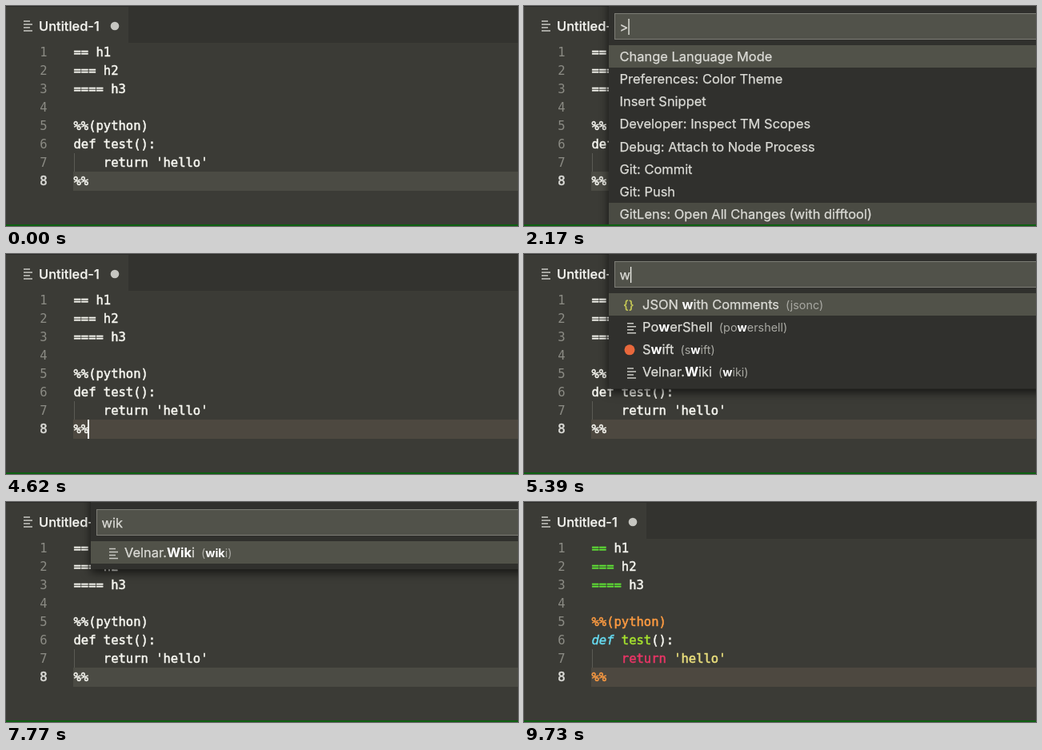
These frames come from a looping animation (640 by 275 pixels, 9800 ms). An HTML page:

```html
<!DOCTYPE html>
<html lang="en">
<head>
<meta charset="utf-8">
<title>Choosing a language mode</title>
<style>
html, body { margin: 0; height: 100%; overflow: hidden; background: #3b3b36; }
svg { display: block; }
text { white-space: pre; }
.ui { font: 16.45px Inter, sans-serif; fill: #dcdcd7; stroke: #dcdcd7; stroke-width: .25px; }
.ui .b { font-weight: 700; fill: #fff; stroke: none; }
.ui .meta { font-size: 14.4px; fill: #a8a8a2; stroke: none; }
.tab { font-weight: 500; fill: #f4f4f0; stroke: #f4f4f0; }
.code { font: 15.5px "DejaVu Sans Mono", monospace; fill: #f6f6f0; stroke: #f6f6f0; stroke-width: .5px; }
.num { font: 15.5px "DejaVu Sans Mono", monospace; fill: #8b8b84; text-anchor: end; }
.now { fill: #dededa; stroke: #dededa; stroke-width: .5px; }
.green { fill: #5fe336; stroke: #5fe336; }
.lime { fill: #a6e22e; stroke: #a6e22e; }
.orange { fill: #fb9a41; stroke: #fb9a41; }
.cyan { fill: #66d9ef; stroke: #66d9ef; font-style: italic; }
.red { fill: #ea3566; stroke: #ea3566; }
.yellow { fill: #e9de7c; stroke: #e9de7c; }
.panel { filter: drop-shadow(0 4px 6px #000a); }
</style>
</head>
<body>
<svg id="stage" width="640" height="275" viewBox="0 0 640 275"></svg>
<script>
const LOOP = 9800, BLINK = 495, ROW = 28.15, COLORED = 8540, ICONS = 4970;
const stage = document.getElementById('stage');

// Each line is a list of [text, highlight class].
const code = [
  [['==', 'green'], [' h1']],
  [['===', 'green'], [' h2']],
  [['====', 'green'], [' h3']],
  [],
  [['%%(python)', 'orange']],
  [['def', 'cyan'], [' '], ['test', 'lime'], ['():']],
  [['    '], ['return', 'red'], [' '], ["'hello'", 'yellow']],
  [['%%', 'orange']]
];

const difftool = 'GitLens: Open All Changes (with difftool)';
const commands = {
  recent: ['Change Language Mode', 'Preferences: Color Theme', 'Insert Snippet',
    'Developer: Inspect TM Scopes', 'Debug: Attach to Node Process',
    'Git: Commit', 'Git: Push', difftool],
  ch: ['Change Language Mode', 'Debug: Attach to Node Process', difftool,
    'Git: Merge Branch...', 'Git: Checkout to...',
    'Add Selection To Next Find Match', 'Add Selection To Previous Find Match',
    'Change All Occurrences'],
  cha: ['Change Language Mode', difftool, 'Git: Stage Changes', 'Git: View Change',
    'Git: Commit All Changes', 'Change End of Line Sequence', 'Change File Encoding',
    'Change All Occurrences']
};

// Languages: [name, id, icon]
const json = ['JSON with Comments', 'jsonc', 'braces'];
const swift = ['Swift', 'swift', 'dot'];
const wiki = ['Velnar.Wiki', 'wiki', 'lines'];
const languages = [['Auto Detect'], ...[['Batch', 'bat'], ['C', 'c'], ['C#', 'csharp'], ['C++', 'cpp'],
  ['Clojure', 'clojure'], ['CoffeeScript', 'coffeescript'], ['CSS', 'css']].map(l => [...l, 'lines'])];

const steps = [
  { at: 0, blink: 690 },
  { at: 2165, input: '>', rows: commands.recent },
  { at: 3215, input: '>c', key: 'ch', rows: commands.ch, split: 5 },
  { at: 3425, input: '>ch', key: 'ch', rows: commands.ch, split: 5 },
  { at: 3635, input: '>cha', key: 'cha', rows: commands.cha, split: 5 },
  { at: 4615, warm: true },
  { at: 4755, input: '', rows: languages, split: 1, warm: true },
  { at: 5250, input: 'w', key: 'wi', rows: [json, ['PowerShell', 'powershell', 'lines'], swift, wiki], warm: true },
  { at: 5740, input: 'wi', key: 'wi', rows: [json, swift, wiki], warm: true },
  { at: 6230, input: 'wik', key: 'wik', rows: [wiki] },
  { at: 8115, warm: true }
];

const rect = (x, y, w, h, fill, more = '') =>
  `<rect x="${x}" y="${y}" width="${w}" height="${h}" fill="${fill}" ${more}/>`;
const text = (x, y, cls, body) => `<text x="${x}" y="${y}" class="${cls}">${body}</text>`;
const escape = s => s.replace(/&/g, '&amp;').replace(/</g, '&lt;').replace(/>/g, '&gt;');
const fileIcon = (x, y) =>
  `<path d="M${x} ${y}h8m-8 4h11m-11 4h8m-8 4h11" fill="none" stroke="#c9c9c4" stroke-width="1.5"/>`;

function mark(s, query, key) {
  if (!query) return escape(s);
  const low = s.toLowerCase();
  let i = low.indexOf(key);
  if (i < 0) i = low.indexOf(query);
  if (i < 0) return escape(s);
  const end = i + query.length;
  return `${escape(s.slice(0, i))}<tspan class="b">${s.slice(i, end)}</tspan>${escape(s.slice(end))}`;
}

function icon(kind, y) {
  if (kind === 'lines') return fileIcon(129, y - 5);
  if (kind === 'dot') return `<circle cx="132" cy="${y}" r="6.5" fill="#e8683c"/>`;
  if (kind === 'braces') return `<text x="124" y="${y + 5}" class="ui" style="font-size:15px;font-weight:600;fill:#c3c655;stroke:none">{}</text>`;
  return '';
}

function editor(step, colored, cursor) {
  let out = rect(0, 0, 640, 275, '#3b3b36') + rect(153, 0, 487, 46, '#33332f') + rect(0, 0, 640, 1, '#2b2b28');
  out += fileIcon(22, 19) + text(41, 31, 'ui tab', 'Untitled-1') +
    '<circle cx="136" cy="25" r="5.3" fill="#c6c6c1"/>';
  out += rect(84, 207, 556, 24, step.warm ? '#4d4840' : '#4b4b44') + rect(85, 184, 1, 23, '#5b5b54');
  code.forEach((line, i) => {
    const y = 63 + 23 * i;
    out += text(51.5, y, i === 7 ? 'num now' : 'num', i + 1);
    out += text(84.5, y, 'code', line.map(([s, cls]) =>
      `<tspan class="${colored && cls || ''}">${s}</tspan>`).join(''));
  });
  if (cursor) out += rect(102, 207, 2, 24, '#fbfbf6');
  return out;
}

function picker({ input, rows, key, split }, icons, cursor) {
  const query = input.replace('>', '');
  const full = rows.length > 7;
  const height = full ? 290 : 56 + ROW * rows.length;
  let out = rect(106, -10, 560, height + 10, '#30302d', 'class="panel"');
  out += rect(113.5, 9.5, 540, 32, '#51524a', 'stroke="#7d7d76"');
  out += rect(106, 49, 534, 28, '#515249');
  if (full) out += rect(106, 246, 534, 29, '#4a4b43');
  if (split) out += rect(106, Math.round(48 + ROW * split), 534, 1, '#565651');
  rows.forEach((row, i) => {
    const y = 63.5 + ROW * i;
    if (typeof row === 'string') {
      out += text(119.5, y + 5.5, 'ui', mark(row, query, key));
      return;
    }
    const [name, id, kind] = row;
    const meta = id ? `<tspan class="meta" dx="8">(${mark(id, query, key)})</tspan>` : '';
    if (icons) out += icon(kind, y);
    out += text(kind ? 148 : 119.5, y + 5.5, 'ui', mark(name, query, key) + meta);
  });
  out += `<text id="typed" x="119.5" y="32" class="ui">${escape(input)}</text>`;
  if (cursor) out += rect(0, 16, 1.3, 20, '#f0f0ea', 'id="caret"');
  return out;
}

let shown = '';
function draw(t) {
  const step = steps.filter(s => s.at <= t).pop();
  const since = t - (step.blink || step.at);
  const cursor = since >= 0 && Math.floor(since / BLINK) % 2 === 0;
  const open = step.input !== undefined;
  const svg = editor(step, t >= COLORED, cursor && !open) +
    (open ? picker(step, t >= ICONS, cursor) : '') + rect(0, 273, 640, 2, '#0d5f10');
  if (svg === shown) return;
  stage.innerHTML = shown = svg;
  const caret = document.getElementById('caret');
  if (caret) {
    const width = step.input ? document.getElementById('typed').getComputedTextLength() : 0;
    caret.setAttribute('x', 119.5 + width);
  }
}

const start = performance.now();
function tick() {
  draw((performance.now() - start) % LOOP);
  requestAnimationFrame(tick);
}
tick();
</script>
</body>
</html>
```
